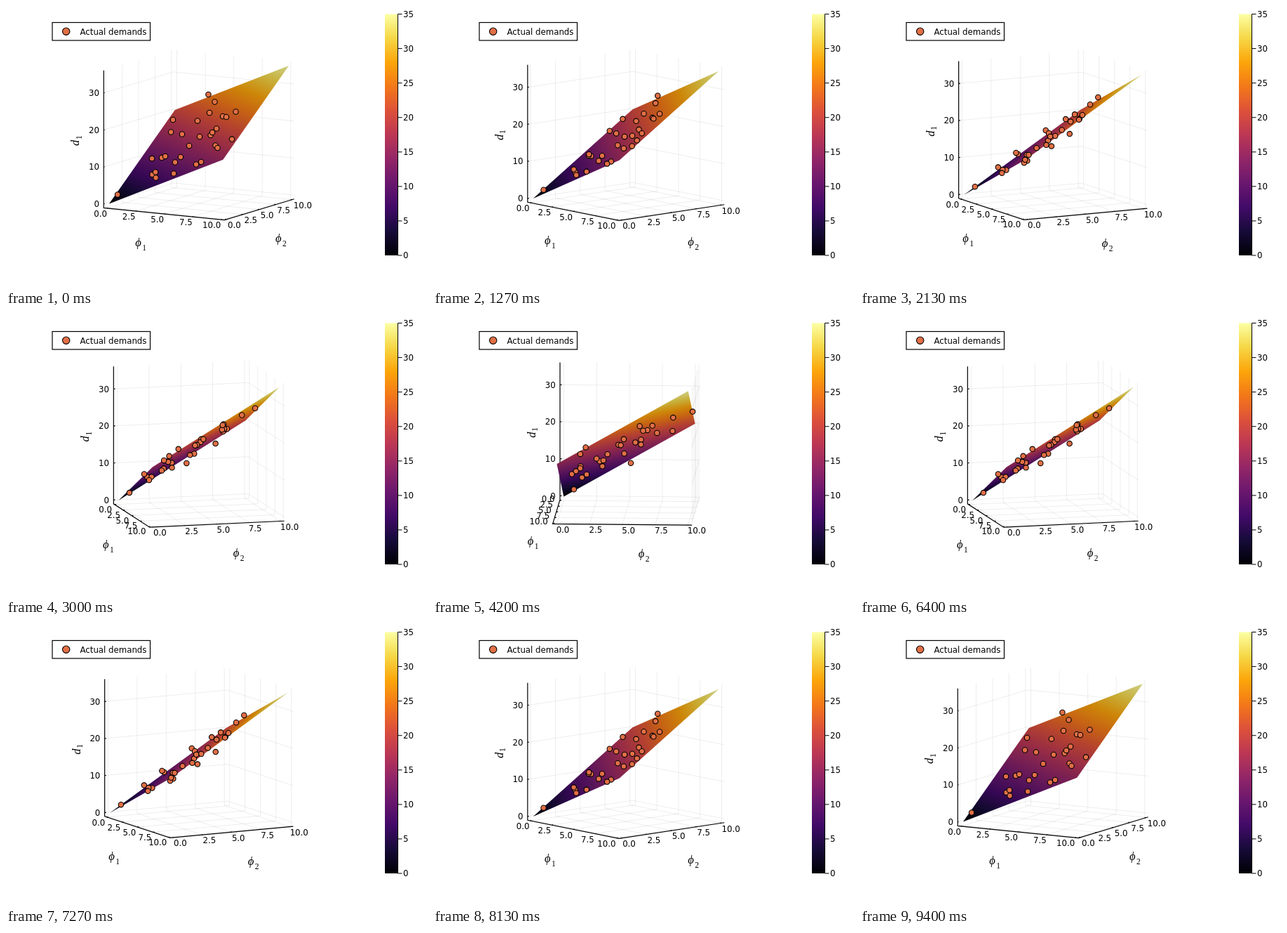
An HTML page with a canvas that plays this animation: 600x400 px, repeating every 9470 ms.

```html
<!DOCTYPE html>
<html lang="en">
<head>
<meta charset="utf-8">
<title>Demand surface</title>
<style>
html, body { margin: 0; width: 100%; height: 100%; overflow: hidden; background: #fff; }
canvas { display: block; }
</style>
</head>
<body>
<canvas id="plot" width="600" height="400"></canvas>
<script>
const ctx = document.getElementById('plot').getContext('2d');

const LOOP = 9470, STEPS = 142;
const UNIT = 18.745, Z_UNIT = 5.27;            // pixels per data unit
const TILT = UNIT * Math.sin(Math.PI / 18);    // camera elevation of 10 degrees
const CX = 275, CY = 183.3;
const LO = -0.3, HI = 10.3, Z_LO = -1.05, Z_HI = 36.05;
const TICKS = [0, 2.5, 5, 7.5, 10], Z_TICKS = [0, 10, 20, 30];
const SANS = '11.75px "DejaVu Sans", sans-serif';
const SERIF = '"Liberation Serif", "DejaVu Serif", serif';

const INFERNO = [0x000004, 0x160b39, 0x420a68, 0x6a176e, 0x932667, 0xbc3754,
  0xdd513a, 0xf37819, 0xfca50a, 0xf6d746, 0xfcffa4];

// phi1, phi2, demand
const DEMANDS = [
  [.29, .79, 2.13], [.8, 8.33, 18.46], [1.97, 5.99, 16.76], [3.16, 5.62, 16.75], [3.55, 7.29, 19.59],
  [2.96, 9.97, 25.08], [4.33, 8.56, 24.27], [4.77, 7, 22.3], [6.12, 6.69, 21.93], [6.6, 6.39, 22.05],
  [7.55, 6.18, 23.88], [9.53, 2.17, 19.23], [6.59, 4.92, 19.7], [6.31, 4.5, 18.04], [5.5, 6.17, 17.66],
  [5.28, 4.62, 17.28], [4.24, 4.83, 14.38], [7.19, 3.71, 15.98], [8.53, 1.71, 16.8], [7.12, 1.66, 12.6],
  [6.71, 1.61, 11.83], [4.56, 2.98, 12.43], [3.97, 3.15, 10.73], [5.16, .89, 9.27], [.79, 5.15, 9.72],
  [2.79, 3.17, 11.59], [3.38, 2.68, 12.42], [2.7, 1.89, 7.7], [3.43, 1.11, 9], [3.2, 1.56, 7.17]];

let cos, sin;

function project(x, y, z) {
  x -= 5; y -= 5; z -= 17.5;
  return [CX + UNIT * (x * cos + y * sin), CY + TILT * (x * sin - y * cos) - Z_UNIT * z];
}

function inferno(x0, y0, x1, y1, light) {
  const gradient = ctx.createLinearGradient(x0, y0, x1, y1);
  INFERNO.forEach((c, i) => {
    const rgb = [c >> 16, c >> 8 & 255, c & 255].map(v => Math.round(v * light));
    gradient.addColorStop(i / 10, `rgb(${rgb})`);
  });
  return gradient;
}

function polyline(points, color = '#000', width = 1.2) {
  ctx.beginPath();
  points.forEach(p => ctx.lineTo(...p));
  ctx.strokeStyle = color;
  ctx.lineWidth = width;
  ctx.stroke();
}

const line3d = (points, ...style) => polyline(points.map(p => project(...p)), ...style);

function text(str, x, y, align = 'left', font = SANS) {
  ctx.font = font;
  ctx.textAlign = align;
  ctx.fillStyle = '#000';
  ctx.fillText(str, x, y);
}

function symbol(letter, sub, x, y, subX, subY) {
  text(letter, x, y, 'left', 'italic 16.5px ' + SERIF);
  text(sub, x + subX, y + subY, 'left', '11.5px ' + SERIF);
}

function marker(x, y, r) {
  ctx.beginPath();
  ctx.arc(x, y, r, 0, 2 * Math.PI);
  ctx.fillStyle = '#e26f46';
  ctx.fill();
  ctx.strokeStyle = '#000';
  ctx.lineWidth = 1.1;
  ctx.stroke();
}

function drawGrid() {
  const style = ['rgba(0,0,0,.1)', .7];
  for (const t of TICKS) {
    line3d([[t, LO, Z_LO], [t, HI, Z_LO], [t, HI, Z_HI]], ...style);
    line3d([[HI, t, Z_LO], [LO, t, Z_LO], [LO, t, Z_HI]], ...style);
  }
  for (const t of Z_TICKS) line3d([[LO, LO, t], [LO, HI, t], [HI, HI, t]], ...style);
}

function drawAxes() {
  const tick = .13, gap = 8, lift = 4.3;
  const squash = TILT / UNIT;
  line3d([[LO, LO, Z_HI], [LO, LO, Z_LO], [HI, LO, Z_LO], [HI, HI, Z_LO]]);

  // labels sit perpendicular to the projected axis
  const xLen = Math.hypot(cos, squash * sin), yLen = Math.hypot(sin, squash * cos);
  for (const t of TICKS) {
    line3d([[t, LO, Z_LO], [t, LO + tick, Z_LO]]);
    line3d([[HI, t, Z_LO], [HI - tick, t, Z_LO]]);
    let [x, y] = project(t, LO, Z_LO);
    text(t.toFixed(1), x - gap * squash * sin / xLen + .5, y + gap * cos / xLen + lift, 'right');
    [x, y] = project(HI, t, Z_LO);
    text(t.toFixed(1), x + gap * squash * cos / yLen - .5, y + gap * sin / yLen + lift);
  }
  for (const t of Z_TICKS) {
    line3d([[LO, LO, t], [LO, LO + tick, t]]);
    const [x, y] = project(LO, LO, t);
    text(t, x - 6.3, y + lift, 'right');
  }

  let [x, y] = project(5, LO, Z_LO);
  symbol('ϕ', '1', x - 41, y + 46.5, 10, 6);
  [x, y] = project(HI, 5, Z_LO);
  symbol('ϕ', '2', x + 23, y + 46.5, 10, 6);
  [x, y] = project(LO, LO, 17.5);
  ctx.save();
  ctx.translate(x - 35, y + 9.5);
  ctx.rotate(-Math.PI / 2);
  symbol('d', '1', 0, 0, 9, 3.5);
  ctx.restore();
}

// d = 1.5 phi1 + 2 phi2, painted in data coordinates
function drawSurface() {
  ctx.save();
  ctx.transform(UNIT * cos, TILT * sin - 1.5 * Z_UNIT,
    UNIT * sin, -TILT * cos - 2 * Z_UNIT, ...project(0, 0, 0));
  ctx.fillStyle = inferno(0, 0, 8.4, 11.2, .814);
  ctx.fillRect(0, 0, 10, 10);
  ctx.restore();
}

function drawColorbar() {
  const top = 11.5, bottom = 355;
  ctx.fillStyle = inferno(0, bottom, 0, top, 1);
  ctx.fillRect(540, top, 18, bottom - top);
  polyline([[558.5, top], [558.5, bottom]], '#000', 1);
  for (let v = 0; v <= 35; v += 5) {
    const y = bottom + (top - bottom) * v / 35;
    polyline([[558.5, y], [564.5, y]], '#000', 1);
    text(v, 566, y + 4.3);
  }
}

function drawLegend() {
  ctx.strokeStyle = '#000';
  ctx.lineWidth = 1.2;
  ctx.strokeRect(66, 23.5, 139.5, 25.5);
  marker(85.7, 36.2, 5.2);
  text('Actual demands', 105.5, 40.7);
}

function draw(now) {
  const step = Math.floor((Math.floor(now % LOOP / 10) + .5) * .15);
  const azimuth = (30 + Math.min(step, STEPS - 1 - step)) * Math.PI / 180;
  cos = Math.cos(azimuth);
  sin = Math.sin(azimuth);

  ctx.fillStyle = '#fff';
  ctx.fillRect(0, 0, 600, 400);
  drawGrid();
  drawAxes();
  drawSurface();
  for (const d of DEMANDS) marker(...project(...d), 3.7);
  drawColorbar();
  drawLegend();
}

const start = performance.now();
function loop() {
  draw(performance.now() - start);
  requestAnimationFrame(loop);
}
loop();
</script>
</body>
</html>
```
